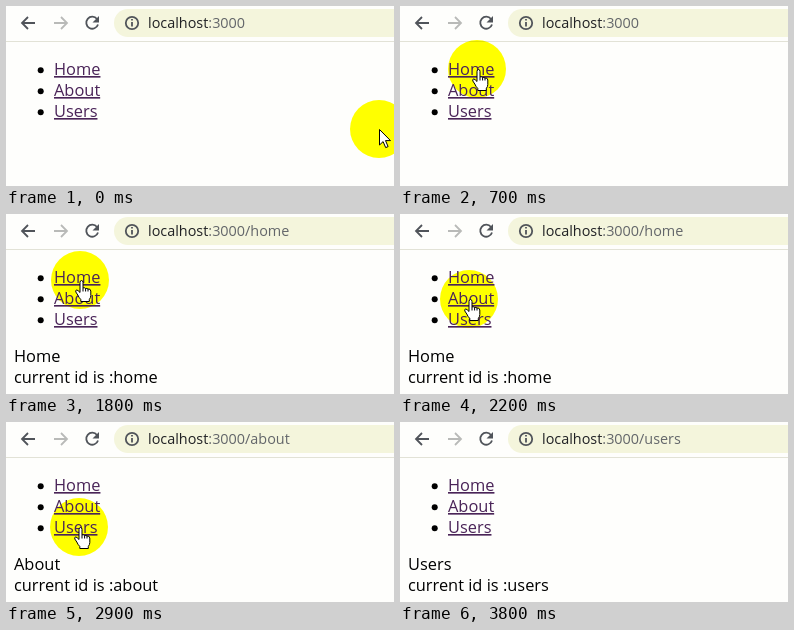
These frames come from a looping animation (388x180 px, 4.3 s). An HTML page:

```html
<!DOCTYPE html>
<html lang="en">
<head>
<meta charset="utf-8">
<title>Router demo</title>
<style>
  html, body { margin: 0; width: 100%; height: 100%; overflow: hidden; background: #fefefc; }
  svg { display: block; width: 388px; height: 180px; isolation: isolate; }
  text { font-family: "Open Sans", "Noto Sans", sans-serif; font-size: 16.4px; fill: #000; }
  #address { font-size: 14.4px; fill: #63666a; }
  #address .host { fill: #202124; }
  #links text { fill: #4a2458; text-decoration: underline; }
  #links text.active { fill: #e0204c; }
  #spot { fill: #ff0; mix-blend-mode: multiply; }
  .icon { fill: none; stroke: #50545a; stroke-width: 1.8; }
  .pointer { fill: #fff; stroke: #000; stroke-linejoin: round; }
</style>
</head>
<body>
<svg viewBox="0 0 388 180">
  <rect x="108" y="3" width="310" height="28" rx="14" fill="#f4f5dc"/>
  <path d="M0 35.5H388" stroke="#e2e2d6"/>

  <path class="icon" d="M29 17H16.5M22 11l-6 6 6 6"/>
  <path class="icon" style="stroke:#b9bab8" d="M48 17H60.5M55 11l6 6-6 6"/>
  <path class="icon" d="M91 13A6 6 0 1 0 92 18.5"/>
  <path d="M93 10v6.5h-6.5z" fill="#50545a"/>
  <circle class="icon" cx="126" cy="17" r="6.2"/>
  <path class="icon" d="M126 16v4.5M126 13v1.6"/>

  <circle id="spot" r="29"/>

  <text id="address" x="142" y="22"><tspan class="host">localhost</tspan>:3000<tspan id="route"></tspan></text>
  <g id="links"></g>
  <text id="heading" x="8" y="148"></text>
  <text id="detail" x="8" y="169"></text>

  <g id="cursor">
    <path id="arrow" class="pointer" d="M.5.5v15.5l3.6-3.4 2.6 6 2.4-1-2.6-6h5z"/>
    <g id="hand" class="pointer" transform="translate(2 .5)">
      <path d="M-2 2q0-2 1.5-2t1.5 2v5.500q1-1 2.600.500q1.500-.500 2.400.500q2.500-.500 2.800 2v4.500q0 2-1.500 4v2h-8.500v-2q-2-2-3-4.500l-2-3q-.500-2 1-2q1 0 3.200 2.500z"/>
      <path fill="none" d="M1 7.500v3.500M3.600 8v3M6 8.500v2.500"/>
    </g>
  </g>
</svg>
<script>
  const LOOP = 4300, STEP = 100, ROW = 21;
  const START = { x: 373, y: 123 };
  const HAND_ON = 700, HAND_OFF = 3500, LEAVE = 3800;
  const $ = id => document.getElementById(id);

  const pages = [
    { name: "Home", press: 1100 },
    { name: "About", press: 2300 },
    { name: "Users", press: 3000 }
  ];

  // Pointer trips; lift bows the path upwards.
  const trips = [
    { from: 100, to: 700, x: 77, y: 63, lift: 5 },
    { from: 1700, to: 1800, x: 74, y: 66, lift: 0 },
    { from: 1800, to: 2000, x: 69, y: 85, lift: 0 },
    { from: 2700, to: 2900, x: 73, y: 105, lift: 0 },
    { from: 3300, to: 3700, x: 111, y: 128, lift: 0 }
  ];

  function addNode(tag, attrs) {
    const node = document.createElementNS("http://www.w3.org/2000/svg", tag);
    for (const key in attrs) node.setAttribute(key, attrs[key]);
    return $("links").appendChild(node);
  }

  pages.forEach((page, i) => {
    addNode("circle", { cx: 34.7, cy: 64.3 + ROW * i, r: 3 });
    page.link = addNode("text", { x: 48, y: 69 + ROW * i });
    page.link.textContent = page.name;
  });

  function ease(t, from, to) {
    const k = Math.min(1, Math.max(0, (t - from) / (to - from)));
    return k * k * (3 - 2 * k);
  }

  function pointerAt(t) {
    let { x, y } = START;
    for (const trip of trips) {
      const k = ease(t, trip.from, trip.to);
      x += (trip.x - x) * k;
      y += (trip.y - y) * k - trip.lift * Math.sin(Math.PI * k);
    }
    return { x, y };
  }

  const show = (id, on) => $(id).setAttribute("visibility", on ? "visible" : "hidden");

  function draw(now) {
    const t = Math.floor((now % LOOP) / STEP) * STEP;
    const { x, y } = pointerAt(t);
    const present = t < LEAVE;
    const hand = t >= HAND_ON && t < HAND_OFF;
    for (const id of ["spot", "cursor"]) $(id).setAttribute("transform", `translate(${x} ${y})`);
    show("spot", present);
    show("hand", present && hand);
    show("arrow", present && !hand);

    let name = "";
    for (const page of pages) {
      const opened = t >= page.press + STEP;
      page.link.classList.toggle("active", t >= page.press && !opened);
      if (opened) name = page.name;
    }
    const slug = name.toLowerCase();
    $("route").textContent = name && "/" + slug;
    $("heading").textContent = name;
    $("detail").textContent = name && "current id is :" + slug;
  }

  function tick() {
    draw(performance.now());
    requestAnimationFrame(tick);
  }
  tick();
</script>
</body>
</html>
```
